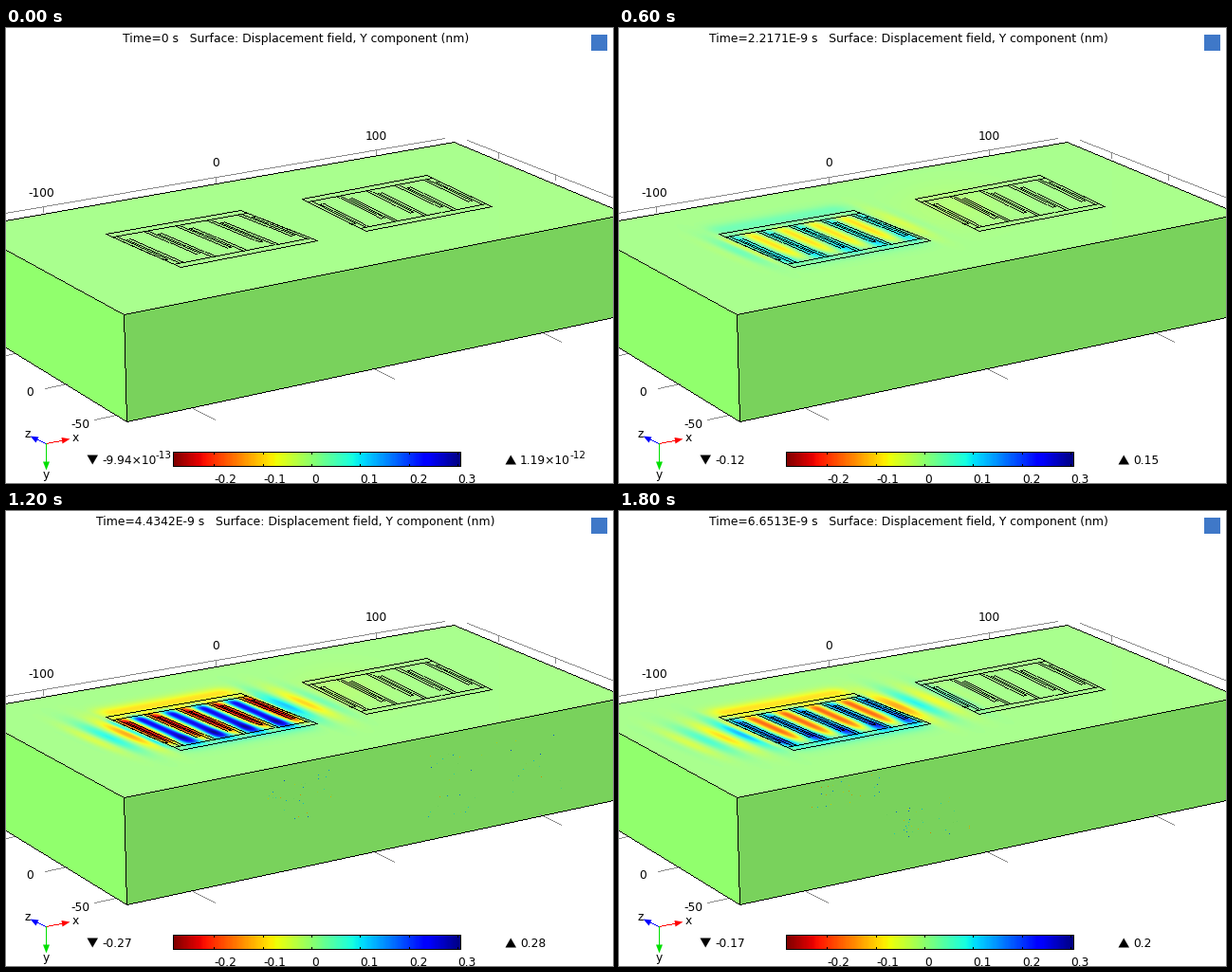
Write a matplotlib script that moves like this. It is 640 by 480 pixels and loops after 1900 ms.

```python
import numpy as np
import matplotlib.pyplot as plt
from matplotlib.animation import FuncAnimation
from matplotlib.colors import to_rgba
from matplotlib.patches import Polygon, Rectangle

W, H, DPI = 640, 480, 100
PX = 72 / DPI
FRAMES, STEP = 19, 3.69514e-10

plt.rcParams["font.family"] = "DejaVu Sans"
fig = plt.figure(figsize=(W / DPI, H / DPI), dpi=DPI, facecolor="white")
ax = fig.add_axes([0, 0, 1, 1])
ax.axis("off")

ink = np.zeros((H, W, 4))  # crisp one-pixel line work


def line(points, color="black"):
    for (x0, y0), (x1, y1) in zip(points, points[1:]):
        count = int(max(abs(x1 - x0), abs(y1 - y0))) + 1
        xs = np.rint(np.linspace(x0, x1, count)).astype(int)
        ys = np.rint(np.linspace(y0, y1, count)).astype(int)
        on = (xs >= 0) & (xs < W) & (ys >= 0) & (ys < H)
        ink[ys[on], xs[on]] = to_rgba(color)


def fill(points, color, z=1):
    ax.add_patch(Polygon(points, closed=True, fc=color, ec="none", lw=0, zorder=z))


def label(x, y, s="", ha="left", size=12.2):
    return ax.text(x, y, s, ha=ha, va="baseline", fontsize=size * PX, zorder=9)


# Grey axes and ticks
GREY = "#8a8a8a"
line([(-1, 195), (462, 116)], GREY)
line([(486, 118), (641, 179)], GREY)
for x, y in [(39, 188), (221, 157), (390, 128), (519, 131), (579, 154)]:
    line([(x, y), (x, y + 6)], GREY)
for x, y in [(197, 401), (386, 358), (562, 319)]:
    line([(x, y), (x + 23, y + 12)], GREY)
for x, y in [(41, 380), (93, 413), (-14, 348)]:
    line([(x, y), (x + 23, y - 5)], GREY)
label(25, 387, "0", "center")
label(78, 421, "-50", "center")
axis_labels = [(label(x, y, s, "center"), y) for x, y, s in
               [(37, 177, "-100"), (220.5, 146, "0"), (389.5, 117, "100")]]

# Block faces
FRONT, RIGHT, BACK = (124, 302), (654, 196), (472, 120)
BACK_LEFT, LEFT = (-1, 203), (-1, 233.5)
LOW, LOW_RIGHT, LOW_LEFT = (127, 415), (654, 302), (-1, 336.5)
TOP = [FRONT, RIGHT, BACK, BACK_LEFT, LEFT]

fill(TOP, "#aaff8c")
fill([FRONT, LOW, LOW_LEFT, LEFT], "#91ff6d")
fill([FRONT, RIGHT, LOW_RIGHT, LOW], "#79d25c")
line([LEFT, FRONT, RIGHT])
line([BACK_LEFT, BACK, RIGHT])
line([LOW_LEFT, LOW, LOW_RIGHT])
line([FRONT, LOW])

# Interdigital electrodes, drawn in each pad's own (u, v) coordinates
PITCH, FINGER = 0.232, 0.027
PADS = [
    [(105, 217), (247, 192), (328, 224), (184, 252)],
    [(312, 180), (443, 155), (512, 188), (379, 214)],
]


def trace(pad, *uv):
    a, b, c, d = np.array(pad, float)
    line([(1 - v) * ((1 - u) * a + u * b) + v * ((1 - u) * d + u * c)
          for u, v in uv])


for pad in PADS:
    trace(pad, (0, 0), (1, 0), (1, 1), (0, 1), (0, 0))
    trace(pad, (0, 0.09), (1, 0.09))
    trace(pad, (0, 0.91), (1, 0.91))
    for k in range(5):
        u = k * PITCH
        trace(pad, (u, 0.09), (u, 0.78), (u + FINGER, 0.78), (u + FINGER, 0.09))
        u += 0.045
        trace(pad, (u, 0.91), (u, 0.2), (u + FINGER, 0.2), (u + FINGER, 0.91))


# Displacement field on the top face
VMIN, VMAX = -0.282, 0.307
X0, X1, Y0, Y1 = 0, 520, 120, 302
gx, gy = np.meshgrid(np.arange(X0, X1), np.arange(Y0, Y1))
corner, across, _, down = np.array(PADS[0], float)
inv = np.linalg.inv(np.column_stack([across - corner, down - corner]))
U, V = np.tensordot(inv, [gx - corner[0], gy - corner[1]], 1)


def bell(x, mid, width):
    return np.exp(-((x - mid) / width) ** 2)


def ramp(x, lo, hi):
    t = np.clip((x - lo) / (hi - lo), 0, 1)
    return t * t * (3 - 2 * t)


INSIDE = ramp(U, -0.08, 0) * ramp(-U, -1.08, -1) * ramp(V, 0, 0.2) * ramp(-V, -1, -0.7)
EDGE = ramp(U, -0.1, 0.1) * ramp(-U, -1.1, -0.9)
OUT = np.maximum(np.maximum(-U, U - 1), 0)
LOBE = (np.where(U < 0.5, 1, -1) * ramp(OUT, 0, 0.06) * np.exp(-OUT / 0.4)
        * bell(V, 0.45, 0.42))
FAR = bell(gx, 350, 55) * bell(gy, 188, 24)
FINGERS = np.cos(2 * np.pi * (U - 0.045) / PITCH) * INSIDE


def field(n):
    strength = 0.17 * (1 - bell(n, 0, 5)) + 0.12 * bell(n, 11, 2.5)
    swing = strength * np.sin(2 * np.pi * (n - 4.7) / 10.7)
    rear = 0.05 * bell(n, 5, 2.5) - 0.09 * ramp(n, 7, 12)
    near = 0.09 * ramp(n, 4, 8)
    ripple = np.cos(2 * np.pi * (OUT - 0.23 - 0.02 * (n - 12)) / 0.26)
    reach = 0.2 + 0.03 * (n - 6)
    return (swing * FINGERS
            + rear * bell(V, -0.08, 0.14) * EDGE
            + near * bell(V, 0.85, 0.18) * EDGE
            + 0.16 * ramp(n, 2, 12) * ripple * LOBE * ramp(-OUT, -reach - 0.1, -reach + 0.1)
            - 0.022 * bell(n, 9, 5) * ramp(n, 0, 4) * FAR)


def shade(d):
    rgb = plt.cm.jet_r((d - VMIN) / (VMAX - VMIN))[..., :3]
    light = 0.25 * np.exp(-6 * np.abs(d))[..., None]
    return rgb + (1 - rgb) * light


surface = ax.imshow(shade(field(0)), extent=(X0 - 0.5, X1 - 0.5, Y1 - 0.5, Y0 - 0.5),
                    interpolation="nearest", aspect="auto", zorder=2)
surface.set_clip_path(Polygon(TOP, closed=True, transform=ax.transData))

# Stray specks on the front face: first and last step, centre, radii, count
CLUSTERS = [(11, 15, 310, 298, 34, 26, 30),
            (11, 13, 515, 278, 75, 34, 40),
            (16, 18, 240, 296, 38, 14, 24),
            (16, 18, 322, 327, 48, 20, 34)]
specks = ax.scatter([], [], s=(1.2 * PX) ** 2, marker="s", linewidths=0, zorder=4)


def speckle(n):
    rng = np.random.default_rng(40 + n)
    points, hues = [np.empty((0, 2))], [np.empty(0)]
    for first, last, cx, cy, rx, ry, count in CLUSTERS:
        if first <= n <= last:
            x, y = rng.uniform(-1, 1, (2, count))
            points.append(np.column_stack([cx + rx * x, cy + ry * y - 0.2 * rx * x]))
            hues.append(rng.uniform(0.2, 0.75, count))
    points, hues = np.rint(np.concatenate(points)), np.concatenate(hues)
    keep = points[:, 1] > 305 - 0.2 * (points[:, 0] - 124)
    colors = plt.cm.jet(hues[keep])
    colors[:, :3] *= 0.8
    return points[keep], colors


# Colour bar
ax.imshow(np.linspace(1, 0, 304)[None, :], cmap="jet", vmin=0, vmax=1,
          extent=(175.5, 479.5, 462.5, 446.5), aspect="auto", zorder=3)
line([(176, 447), (479, 447), (479, 462), (176, 462), (176, 447)])
for k in range(-2, 4):
    x = round(322 + 51.4 * k)
    line([(x, 447), (x, 449)])
    line([(x, 460), (x, 462)])
    label(x - 0.5, 480, f"{k / 10:g}")

# Extremes
fill([(85, 450), (96.5, 450), (90.7, 460)], "black")
fill([(526, 460), (537.5, 460), (531.7, 450)], "black")
low_text, high_text = label(101, 459), label(541.5, 459)
powers = [label(157, 454, "-13", size=10.4), label(594, 454, "-12", size=10.4)]
KEYS = [0, 4, 8, 12, 14, 16, 18]
LOWEST = [0, -0.05, -0.19, -0.27, -0.16, -0.09, -0.17]
HIGHEST = [0, 0.06, 0.24, 0.28, 0.16, 0.13, 0.2]

# Orientation triad
for tip, head, color in [
        ((58, 435), [(58, 431.5), (67, 433), (59, 438)], "red"),
        ((33, 434), [(34, 431), (25, 430), (31, 437)], "blue"),
        ((42, 457), [(38.5, 457), (45.5, 457), (42, 466)], "#00e000")]:
    line([(42, 438), tip], color)
    fill(head, color, 6)
label(72.5, 436, "x", "center")
label(22, 432, "z", "center")
label(42, 475, "y", "center")

ax.add_patch(Rectangle((616, 6), 17, 17, fc="#3f78c8", ec="none", zorder=5))
title = label(305, 15, "", "center", 12.35)

ax.imshow(ink, extent=(-0.5, W - 0.5, H - 0.5, -0.5), interpolation="nearest",
          aspect="auto", zorder=5)
ax.set_xlim(-0.5, W - 0.5)
ax.set_ylim(H - 0.5, -0.5)


def draw(n):
    time = f"{n * STEP:.4E}".replace("E-0", "E-") if n else "0"
    title.set_text(f"Time={time} s   Surface: Displacement field, Y component (nm)")
    surface.set_data(shade(field(n)))

    points, colors = speckle(n)
    specks.set_offsets(points)
    specks.set_facecolor(colors)

    low, high = np.interp(n, KEYS, LOWEST), np.interp(n, KEYS, HIGHEST)
    low_text.set_text(f"{round(low, 2):g}" if n else "-9.94×10")
    high_text.set_text(f"{round(high, 2):g}" if n else "1.19×10")
    for power in powers:
        power.set_visible(n == 0)
    for text, y in axis_labels:
        text.set_y(y - max(0, round(8 * high - 0.8)))
    return []


anim = FuncAnimation(fig, draw, frames=FRAMES, interval=100, repeat=True,
                     repeat_delay=0, blit=False)
plt.show()
```
